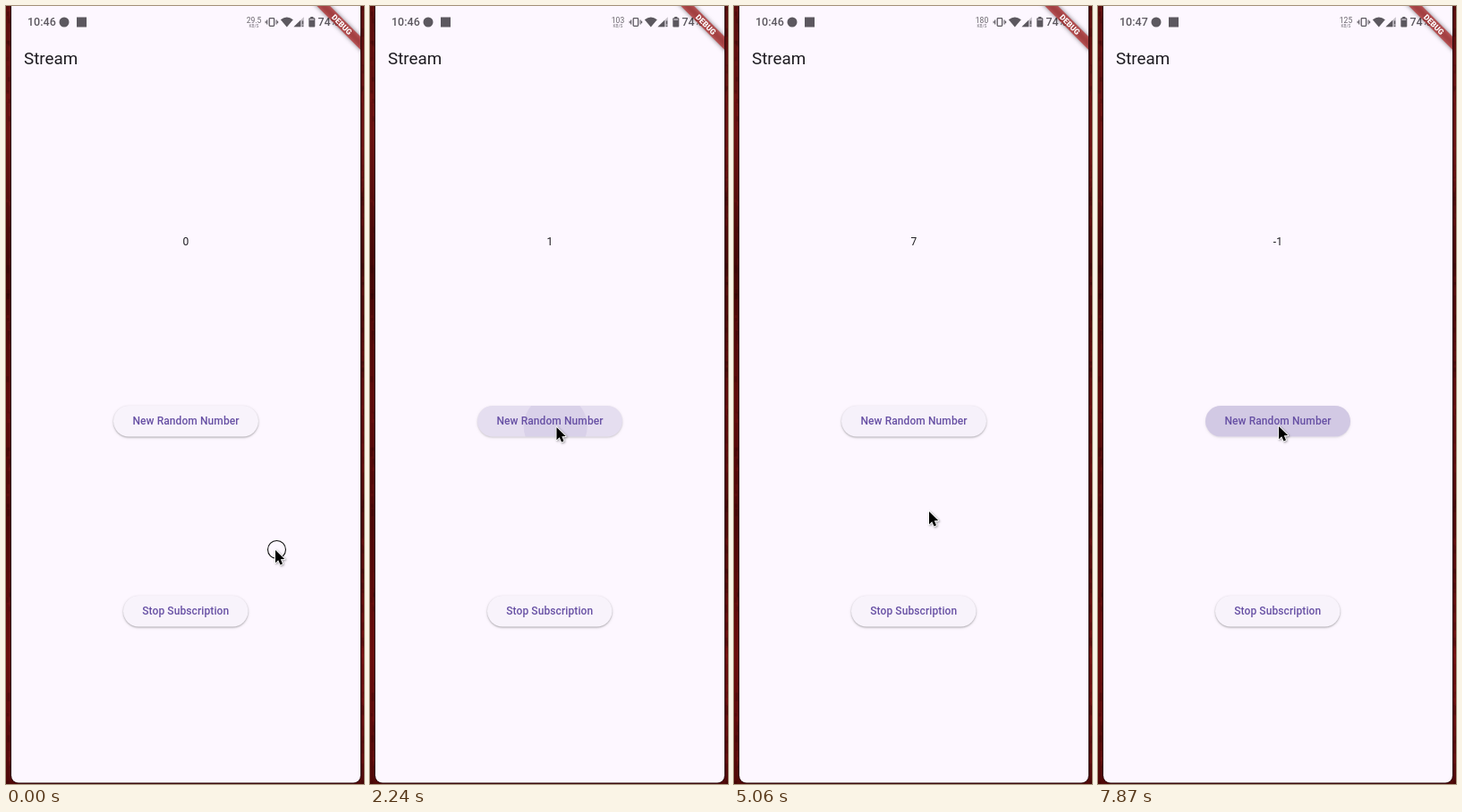
An HTML page with a canvas that plays this animation: 400x868 px, repeating every 8 s.

```html
<!DOCTYPE html>
<html lang="en">
<head>
<meta charset="utf-8">
<title>Stream</title>
<style>
  html, body { margin: 0; width: 100%; height: 100%; overflow: hidden; background: #560b0b; }
  canvas { display: block; width: 400px; height: 868px; }
</style>
</head>
<body>
<canvas id="stage" width="400" height="868"></canvas>
<script>
const ctx = document.getElementById('stage').getContext('2d');
const LOOP = 8000;
const STEP = 148.5; // the screen refreshes in steps
const FONT = 'Roboto, sans-serif';
const SURFACE = '#fdf7ff', INK = '#1d1b20', STATUS = '#5c585f';

// [time, value]
const numbers = [[0, '0'], [2200, '1'], [3430, '8'], [4450, '7'], [7640, '-1']];
const speeds = [[0, '29.5'], [740, '24.9'], [1780, '103'], [2820, '159'],
  [4150, '180'], [6080, '162'], [7420, '125']];
const clocks = [[0, '10:46'], [7270, '10:47']];

// [time, x, y] of the pointer tip
const path = [[0, 301, 607], [140, 301, 607], [400, 275, 566], [700, 222, 490],
  [900, 208.5, 470], [4690, 208.5, 470], [4850, 213, 500], [5049, 218, 564],
  [5250, 214, 640], [5450, 212, 676], [6380, 212, 676], [6650, 213, 610],
  [6979, 210.5, 519], [7250, 202, 469], [8000, 202, 469]];

const buttons = [
  { label: 'New Random Number', x: 120, y: 446, w: 162, h: 34.5, clicks: [2160, 3360, 4380, 7560] },
  { label: 'Stop Subscription', x: 131, y: 658, w: 139.5, h: 34.5, clicks: [5700] }
];

const clamp = v => Math.max(0, Math.min(1, v));
const mix = (a, b, p) => a + (b - a) * p;
const valueAt = (list, t) => list.filter(e => e[0] <= t).pop()[1];

function pointerAt(t) {
  const i = Math.max(1, path.findIndex(p => p[0] > t));
  const a = path[i - 1], b = path[i];
  const p = (t - a[0]) / (b[0] - a[0]);
  return { x: mix(a[1], b[1], p), y: mix(a[2], b[2], p) };
}

function text(str, x, y, size, color, weight = 400, align = 'left', spacing = 0) {
  ctx.font = `${weight} ${size}px ${FONT}`;
  ctx.letterSpacing = spacing + 'px';
  ctx.textAlign = align;
  ctx.fillStyle = color;
  ctx.fillText(str, x, y);
}

function box(x, y, w, h, r = 0) {
  ctx.beginPath();
  ctx.roundRect(x, y, w, h, r);
}

function poly(points, color) {
  ctx.beginPath();
  points.forEach(([x, y]) => ctx.lineTo(x, y));
  ctx.closePath();
  ctx.fillStyle = color;
  ctx.fill();
}

function backdrop() {
  const g = ctx.createLinearGradient(0, 0, 0, 868);
  ['#5b0d0d', '#6a1211', '#430707', '#5e0b0b', '#4d0808', '#6b0d0d', '#500909']
    .forEach((c, i) => g.addColorStop(i / 6, c));
  ctx.fillStyle = g;
  ctx.fillRect(0, 0, 400, 868);
  let seed = 7;
  const rnd = () => (seed = seed * 16807 % 2147483647) / 2147483647;
  for (let i = 0; i < 160; i++) {
    ctx.fillStyle = rnd() < 0.6 ? 'rgba(30,0,0,.2)' : 'rgba(150,30,25,.16)';
    ctx.fillRect(rnd() < 0.5 ? rnd() * 5 : 396 + rnd() * 4, rnd() * 868, 3, 3 + rnd() * 9);
  }
  box(5, -20, 392, 887.5, 9);
  ctx.fillStyle = '#2b0a0c';
  ctx.fill();
  box(6, -20, 390, 886.5, 8);
  ctx.fillStyle = SURFACE;
  ctx.fill();
}

function statusBar(t) {
  text(valueAt(clocks, t), 24, 22, 12.5, STATUS, 500);
  ctx.fillStyle = STATUS;
  ctx.beginPath();
  ctx.arc(65, 18, 5.5, 0, 7);
  ctx.fill();
  ctx.fillRect(79, 12.5, 11, 11);

  text(valueAt(speeds, t), 277, 18.5, 8.5, '#68646b', 400, 'center');
  text('KB/S', 277, 24, 4.8, '#77737a', 400, 'center');

  // vibrate
  ctx.strokeStyle = STATUS;
  ctx.lineWidth = 1.3;
  box(294.2, 13.7, 5.4, 8.6, 0.8);
  ctx.stroke();
  ctx.lineWidth = 1.1;
  ctx.beginPath();
  for (const [x, r] of [[291.7, 2.6], [302.1, 2.6], [290.2, 1.2], [303.6, 1.2]]) {
    ctx.moveTo(x, 18 - r);
    ctx.lineTo(x, 18 + r);
  }
  ctx.stroke();

  // wifi
  ctx.beginPath();
  ctx.moveTo(313.8, 23.5);
  ctx.lineTo(306.8, 15.2);
  ctx.quadraticCurveTo(313.8, 10, 320.8, 15.2);
  ctx.closePath();
  ctx.fillStyle = STATUS;
  ctx.fill();

  // signal
  poly([[321.5, 23.3], [332.8, 23.3], [332.8, 12.2]], '#c5c0c8');
  poly([[321.5, 23.3], [329.2, 23.3], [329.2, 15.8]], STATUS);
  ctx.fillStyle = STATUS;
  ctx.fillRect(330.8, 16.5, 1.4, 4);
  ctx.fillRect(330.8, 21.6, 1.4, 1.5);

  // battery
  box(338.3, 13.3, 7, 10.2, 1);
  ctx.fill();
  ctx.fillRect(340.2, 12, 3.2, 2);
  ctx.fillStyle = '#b9b4bc';
  ctx.fillRect(339.4, 14.4, 4.8, 1.6);

  text('74%', 348.5, 22, 12.5, STATUS, 500);
}

function banner() {
  ctx.save();
  box(6, -20, 390, 886, 8);
  ctx.clip();
  ctx.translate(396, 0);
  ctx.rotate(Math.PI / 4);
  ctx.filter = 'blur(2.8px)';
  ctx.fillStyle = 'rgba(0,0,0,.5)';
  ctx.fillRect(-40, 24, 80, 10.4);
  ctx.filter = 'none';
  ctx.fillStyle = 'rgba(183,28,28,.63)';
  ctx.fillRect(-40, 24, 80, 10.4);
  text('DEBUG', 0, 32.3, 8.7, '#fff', 900, 'center');
  ctx.restore();
}

function drawButton(b, t, tip) {
  const hover = tip.x > b.x && tip.x < b.x + b.w && tip.y > b.y && tip.y < b.y + b.h;
  const ripples = b.clicks.map(c => t - c).filter(age => age > 0 && age < 700).map(age => ({
    r: 18 + age * 0.26,
    shift: clamp(age / 400),
    alpha: 0.15 * clamp(age / 110) * clamp((700 - age) / 350)
  }));
  const pressed = ripples.reduce((m, r) => Math.max(m, r.alpha), 0) / 0.15;

  ctx.save();
  ctx.shadowColor = `rgba(0,0,0,${0.34 - 0.22 * pressed})`;
  ctx.shadowBlur = 2.2;
  ctx.shadowOffsetY = 1;
  box(b.x, b.y, b.w, b.h, b.h / 2);
  ctx.fillStyle = '#f8f3fb';
  ctx.fill();
  ctx.restore();

  ctx.save();
  box(b.x, b.y, b.w, b.h, b.h / 2);
  ctx.clip();
  if (hover) {
    ctx.fillStyle = 'rgba(103,80,164,.13)';
    ctx.fillRect(b.x, b.y, b.w, b.h);
  }
  const cx = b.x + b.w / 2, cy = b.y + b.h / 2;
  for (const r of ripples) {
    ctx.beginPath();
    ctx.arc(mix(tip.x, cx, r.shift), mix(tip.y, cy, r.shift), r.r, 0, 7);
    ctx.fillStyle = `rgba(103,80,164,${r.alpha})`;
    ctx.fill();
  }
  ctx.restore();

  text(b.label, cx, cy + 4, 12, '#6750a4', 500, 'center', 0.09);
}

function pointer({ x, y }, ring) {
  if (ring) {
    ctx.beginPath();
    ctx.arc(302.5, 606.5, 10, 0, 7);
    ctx.strokeStyle = '#111';
    ctx.lineWidth = 1.1;
    ctx.stroke();
  }
  ctx.save();
  ctx.translate(x, y);
  ctx.beginPath();
  [[0, 0], [0, 14.2], [3.2, 11.2], [5.6, 16.4], [8, 15.3], [5.8, 10.3], [10.2, 10.1]]
    .forEach(([px, py]) => ctx.lineTo(px, py));
  ctx.closePath();
  ctx.shadowColor = 'rgba(0,0,0,.4)';
  ctx.shadowBlur = 2.5;
  ctx.shadowOffsetX = ctx.shadowOffsetY = 1;
  ctx.strokeStyle = '#fff';
  ctx.lineWidth = 1.8;
  ctx.lineJoin = 'round';
  ctx.stroke();
  ctx.shadowColor = 'transparent';
  ctx.fillStyle = '#000';
  ctx.fill();
  ctx.restore();
}

function draw(now) {
  const t = Math.floor((now % LOOP) / STEP) * STEP;
  const tip = pointerAt(t);
  backdrop();
  statusBar(t);
  banner();
  text('Stream', 20, 65, 18.8, INK);
  text(valueAt(numbers, t), 201, 267, 12, INK, 400, 'center', 0.2);
  buttons.forEach(b => drawButton(b, t, tip));
  pointer(tip, t < STEP);
}

const start = performance.now();
function loop() {
  draw(performance.now() - start);
  requestAnimationFrame(loop);
}
loop();
</script>
</body>
</html>
```
